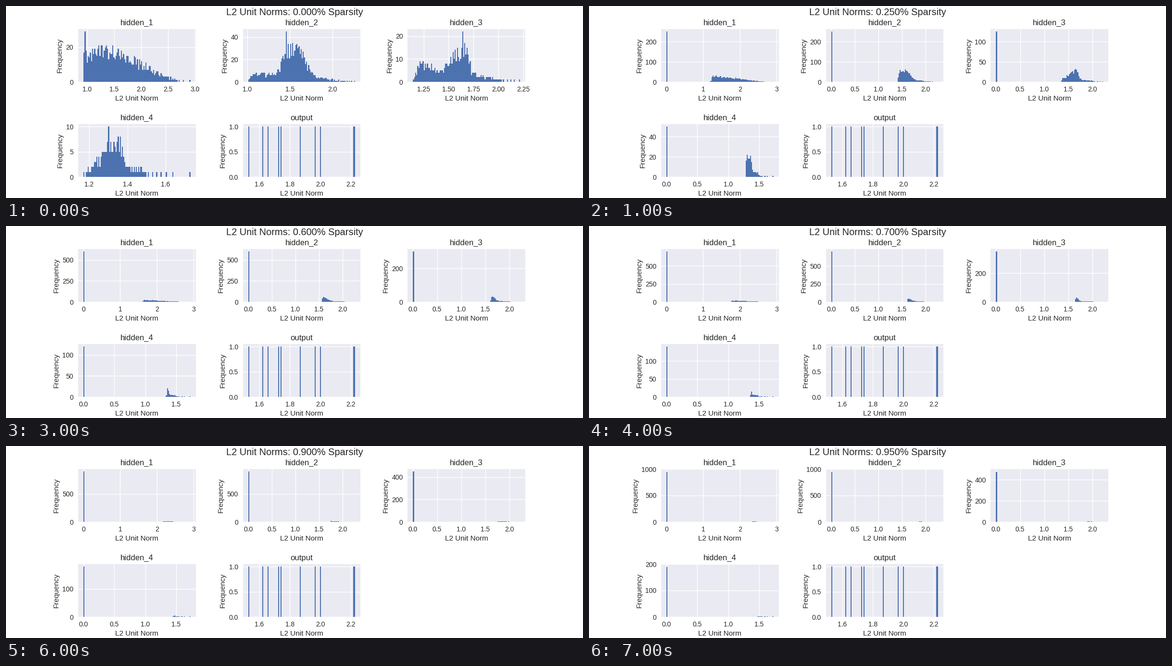
A matplotlib script that plays this animation: 1200 by 400 pixels, repeating every 8 s.

```python
import numpy as np
import matplotlib.pyplot as plt
from matplotlib.animation import FuncAnimation

plt.style.use("seaborn-v0_8")
plt.rcParams.update({"font.family": "Liberation Sans", "xtick.major.pad": 6.3})

BINS = 100
SPARSITY = [0, 0.25, 0.5, 0.6, 0.7, 0.8, 0.9, 0.95]
rng = np.random.default_rng(4)


def sample_norms(n, low, high, curve, mode):
    """Return n sorted norms along a noisy density curve with one tall bin."""
    mode_bin, mode_height = mode
    heights = np.interp(np.arange(BINS), *zip(*curve))
    heights *= rng.uniform(0.7, 1.3, BINS)
    heights = np.minimum(heights, 0.85 * mode_height)
    heights[mode_bin] = 0
    heights *= (n - mode_height) / heights.sum()
    heights[mode_bin] = mode_height

    cumulative = np.concatenate([[0], np.cumsum(heights)])
    position = np.interp(np.arange(n) + 0.5, cumulative, np.arange(BINS + 1))
    norms = low + (high - low) * position / BINS
    norms[0], norms[-1] = low, high
    return norms


layers = {
    "hidden_1": sample_norms(
        1000, 0.9295, 2.916,
        [(0, 15), (20, 19), (34, 16), (50, 12), (64, 6.5), (80, 2.5),
         (90, 0.3), (99, 0.2)],
        mode=(1, 29)),
    "hidden_2": sample_norms(
        1000, 1.010, 2.268,
        [(0, 3), (5, 8), (25, 7), (30, 16), (36, 32), (48, 30), (56, 13),
         (62, 5), (80, 1.5), (99, 0.3)],
        mode=(35, 45)),
    "hidden_3": sample_norms(
        500, 1.142, 2.217,
        [(0, 1), (6, 8), (17, 7), (23, 4), (28, 5), (36, 12), (50, 15),
         (54, 5), (62, 2.5), (79, 1), (86, 0.3), (99, 0.3)],
        mode=(46, 22)),
    "hidden_4": sample_norms(
        200, 1.170, 1.730,
        [(0, 0.5), (8, 2), (16, 4), (22, 6), (34, 6.5), (40, 2), (54, 1.5),
         (60, 0.3), (99, 0.05)],
        mode=(23, 10)),
    "output": np.array([1.5265, 1.621, 1.656, 1.726, 1.741, 1.867, 1.965,
                        2.0, 2.218, 2.2285]),
}

fig, axes = plt.subplots(2, 3, figsize=(12, 4), dpi=100)
fig.subplots_adjust(left=0.125, right=0.9, bottom=0.11, top=0.88,
                    wspace=0.4, hspace=0.8)
axes[1, 2].remove()
heading = fig.suptitle("", y=0.99, fontsize=14.4, fontweight="normal")


def prune(norms, fraction):
    """Zero the smallest share of the sorted norms."""
    pruned = norms.copy()
    pruned[:round(fraction * len(norms))] = 0
    return pruned


def upper_limit(peak):
    """Leave 5% headroom, rounded up to a hundred that is almost reached."""
    top = 1.05 * peak
    hundred = 100 * np.ceil(top / 100)
    return hundred if hundred < 1.003 * top else top


def draw(step):
    fraction = SPARSITY[step]
    heading.set_text(f"L2 Unit Norms: {fraction:.3f}% Sparsity")
    for ax, (name, norms) in zip(axes.flat, layers.items()):
        ax.clear()
        shown = norms if name == "output" else prune(norms, fraction)
        counts, _, _ = ax.hist(shown, bins=BINS, color="#4C72B0")
        ax.set(title=name, xlabel="L2 Unit Norm", ylabel="Frequency",
               ylim=(0, upper_limit(counts.max())))


anim = FuncAnimation(fig, draw, frames=len(SPARSITY), interval=1000,
                     repeat=True)
plt.show()
```
